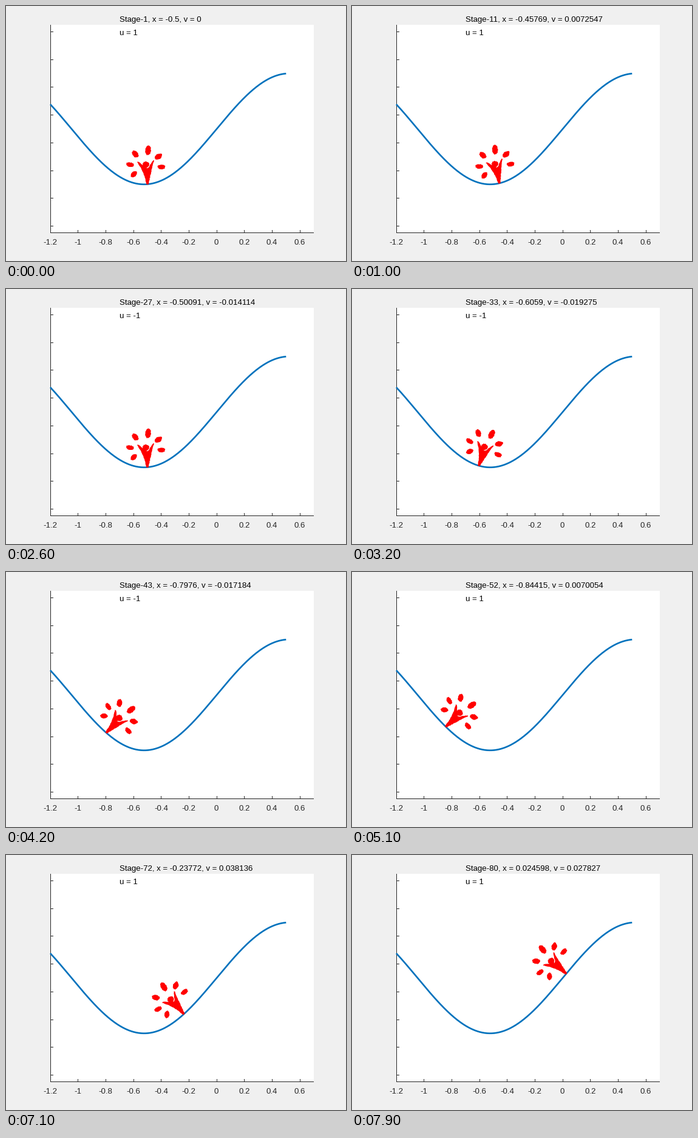
These frames come from a looping animation (560 by 420 pixels, 8000 ms). A matplotlib script:

```python
import numpy as np
import matplotlib.pyplot as plt
from matplotlib.animation import FuncAnimation

W, H, DPI = 560, 420, 100
PT = 72 / DPI                      # points per pixel
STAGES, STEP_MS = 80, 100
SCALE = 228.4                      # pixels per axis unit, both directions
LEFT, TOP, RIGHT, BOTTOM = 73, 31, 507, 374
INK, BLUE, RED = "#262626", "#0072BD", "#FF0000"

plt.rcParams["font.family"] = "Liberation Sans"
plt.rcParams["font.size"] = 13.27 * PT


def to_px(x):
    """Point of the hill 0.4 sin(3x) in pixels."""
    return 73.0 + SCALE * (x + 1.2), 202.4 - SCALE * 0.4 * np.sin(3 * x)


def tilt(x):
    return np.arctan(1.2 * np.cos(3 * x))


def action(stage):
    if stage < 12 or stage > 44:
        return 1
    return 0 if stage in (12, 13, 44) else -1


def simulate():
    """Mountain car states, one (x, v, u) per stage."""
    x, v, states = -0.5, 0.0, []
    for stage in range(1, STAGES + 1):
        u = action(stage)
        states.append((x, v, u))
        v += 0.001 * u - 0.0025 * np.cos(3 * x)
        x += v
    return states


def rotate(pts, a):
    c, s = np.cos(a), np.sin(a)
    return pts @ np.array([[c, -s], [s, c]])


rng = np.random.default_rng(4)


def leaf(cx, cy, length, width, deg):
    t = np.linspace(0, 2 * np.pi, 20, endpoint=False)
    r = 1 + rng.uniform(-0.1, 0.12, t.size)
    pts = np.column_stack([length / 2 * r * np.cos(t), width / 2 * r * np.sin(t)])
    return rotate(pts, np.radians(deg)) + (cx, cy)


def rough(corners):
    """Closed outline resampled with a slightly ragged edge."""
    pts = np.array(corners + corners[:1], float)
    dist = np.r_[0, np.cumsum(np.hypot(*np.diff(pts, axis=0).T))]
    s = np.arange(0, dist[-1], 2.0)
    out = np.column_stack([np.interp(s, dist, pts[:, k]) for k in (0, 1)])
    return out + rng.uniform(-0.45, 0.45, out.shape)


# Plant parts as offsets from the root, posed for x = -0.5
TRUNK = [(-17.3, -36.8), (-14, -36.5), (-9.5, -32.5), (-5, -29), (-1, -26.5),
         (2, -27), (4.5, -32), (7.5, -37), (10.5, -40), (11.2, -38), (8.5, -31.5),
         (7, -25), (5.8, -18), (4, -10), (2, 0.5), (-1.4, 0.5), (-3.2, -8),
         (-5.6, -15), (-8.3, -22), (-12, -29)]
PARTS = [
    rough(TRUNK),
    leaf(-2.6, -32.2, 10.8, 10.2, 0),
    leaf(-22.3, -16.5, 12, 7.8, 46),
    leaf(-28.5, -32.3, 13, 7.2, -8),
    leaf(-20, -49.5, 13, 8.6, -50),
    leaf(1.2, -55.5, 15.5, 9.2, 84),
    leaf(18, -45.5, 13, 8.6, 35),
    leaf(23, -28.5, 12.5, 7.8, -2),
]

fig = plt.figure(figsize=(W / DPI, H / DPI), dpi=DPI, facecolor="#F0F0F0")
ax = fig.add_axes([0, 0, 1, 1])
ax.set_xlim(0, W)
ax.set_ylim(H, 0)
ax.axis("off")


def block(x, y, w, h, color=INK):
    ax.add_patch(plt.Rectangle((x, y), w, h, fc=color, lw=0, zorder=1))


block(LEFT, TOP, RIGHT - LEFT, BOTTOM - TOP, "white")
block(LEFT, TOP, 1, BOTTOM - TOP)
block(LEFT, BOTTOM - 1, RIGHT - LEFT, 1)
for k in range(8):
    block(LEFT, int(42.5 + 45.7 * k), 5, 1)
for k in range(-6, 4):
    x = to_px(k / 5)[0]
    block(int(x), BOTTOM - 5, 1, 5)
    ax.text(x - 0.4, 393.3, f"{k / 5:g}", color=INK, ha="center", va="baseline")

ax.plot(*to_px(np.linspace(-1.2, 0.5, 300)), color=BLUE, lw=2.67 * PT,
        solid_capstyle="butt")
plant = [ax.fill(*p.T, color=RED, lw=0, zorder=5)[0] for p in PARTS]
title = ax.text(187, 26, "", color="black", va="baseline")
control = ax.text(187, 48, "", color="black", va="baseline")

STATES = simulate()


def draw(i):
    x, v, u = STATES[i]
    root = to_px(x)
    turn = tilt(x) - tilt(-0.5)
    for patch, pts in zip(plant, PARTS):
        patch.set_xy(rotate(pts, turn) + root)
    title.set_text(f"Stage-{i + 1}, x = {x:.5g}, v = {v:.5g}")
    control.set_text(f"u = {u}")
    return [*plant, title, control]


anim = FuncAnimation(fig, draw, frames=STAGES, interval=STEP_MS,
                     repeat=True, repeat_delay=0, blit=False)
plt.show()
```
